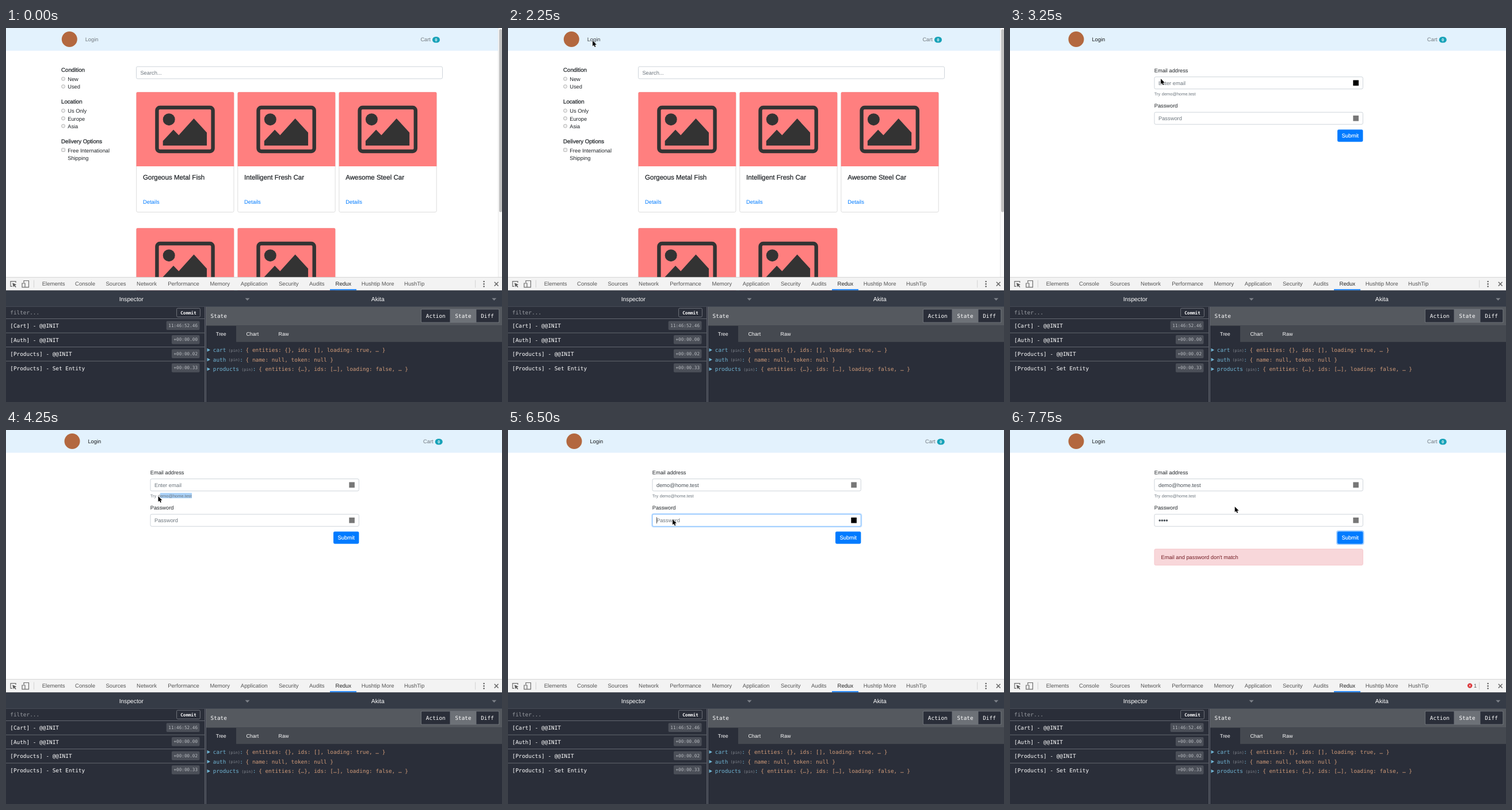
These frames come from a looping animation (862 by 649 pixels, 8000 ms). An HTML page:

```html
<!DOCTYPE html>
<html lang="en">
<head>
<meta charset="utf-8">
<title>Store login demo</title>
<style>
html, body { margin: 0; width: 100%; height: 100%; overflow: hidden; background: #fff; }
svg { display: block; width: 862px; height: 649px; }
text { font-family: "Liberation Sans", Arial, sans-serif; text-rendering: geometricPrecision; white-space: pre; }
.mono { font-family: "DejaVu Sans Mono", monospace; }
</style>
</head>
<body>
<script>
const LOOP = 8000, TICK = 250;
const EMAIL = 'demo@home.test';
const INK = '#212529', MUTED = '#6c757d', BLUE = '#007bff', PANEL = '#2a2e39';

function el(parent, tag, attrs = {}, content) {
  const node = document.createElementNS('http://www.w3.org/2000/svg', tag);
  for (const k in attrs) node.setAttribute(k, attrs[k]);
  if (content !== undefined) node.textContent = content;
  if (parent) parent.append(node);
  return node;
}
const group = (parent, attrs) => el(parent, 'g', attrs);
const rect = (p, x, y, width, height, fill, more) => el(p, 'rect', { x, y, width, height, fill, ...more });
const path = (p, d, attrs) => el(p, 'path', { d, ...attrs });
const dot = (p, cx, cy, r, fill, more) => el(p, 'circle', { cx, cy, r, fill, ...more });
// Text is placed by the middle of its capitals.
const text = (p, x, cy, s, size, fill, more) =>
  el(p, 'text', { x, y: cy + size * 0.36, 'font-size': size, fill, ...more }, s);
const mono = (p, x, cy, s, fill, size = 9.4, more) =>
  text(p, x, cy, s, size, fill, { class: 'mono', ...more });
const medium = (color, width = 0.25) => ({ stroke: color, 'stroke-width': width });
const show = (node, on) => node.setAttribute('display', on ? 'inline' : 'none');

const svg = el(null, 'svg', { viewBox: '0 0 862 649', width: 862, height: 649 });
document.body.prepend(svg);
rect(svg, 0, 0, 862, 649, '#fff');
rect(svg, 0, 0, 862, 39.5, '#e3f2fd');

// Navigation bar
const nav = group(svg);
dot(nav, 110.3, 19.5, 13.5, '#b3683f');
const loginLink = text(nav, 137.7, 20, 'Login', 9.3, '#000');
text(nav, 720.4, 20, 'Cart', 9.3, '#000', { 'fill-opacity': 0.5 });
rect(nav, 741, 15.2, 13, 10.4, '#17a2b8', { rx: 5.2 });
text(nav, 747.5, 20.5, '0', 7, '#fff', { 'text-anchor': 'middle', 'font-weight': 700 });

// Product list
const shop = group(svg);
const heading = (y, s) => text(shop, 96, y, s, 9.7, INK, medium(INK));
const option = (y, s) => {
  dot(shop, 99.5, y - 0.4, 3, '#f0f0f0', { stroke: '#a3a3a3', 'stroke-width': 0.8 });
  text(shop, 107.2, y, s, 9.3, INK);
};
heading(72.5, 'Condition');
option(88.6, 'New');
option(101.9, 'Used');
heading(127.8, 'Location');
option(143.9, 'Us Only');
option(157.2, 'Europe');
option(170.5, 'Asia');
heading(196.3, 'Delivery Options');
rect(shop, 96.7, 208.7, 5.8, 5.8, '#f0f0f0', { rx: 1, stroke: '#a3a3a3', 'stroke-width': 0.8 });
text(shop, 107.2, 212.6, 'Free International', 9.3, INK);
text(shop, 107.2, 226, 'Shipping', 9.3, INK);

function input(p, x, y, w, h) {
  return rect(p, x, y, w, h, '#fff', { rx: 2.3, stroke: '#ced4da', 'stroke-width': 1 });
}
input(shop, 226.5, 67, 532, 21);
text(shop, 233.4, 77.8, 'Search...', 9.3, MUTED);

function card(x, y, title) {
  const g = group(shop, { transform: `translate(${x} ${y})` });
  rect(g, 0.5, 0.5, 169.3, 208, '#fff', { rx: 2.3, stroke: '#dadada', 'stroke-width': 0.9 });
  path(g, 'M.3 129V2Q.3 .2 2.3 .2H168Q170 .2 170 2V129Z', { fill: '#ff7f7f' });
  rect(g, 36.2, 27, 97.2, 76, 'none', { rx: 5, stroke: '#333', 'stroke-width': 6.4 });
  dot(g, 57, 47.7, 10.5, '#333');
  path(g, 'M46.5 93V85L64.8 65.5 74 75 100.3 46 122.8 70.5V93Z', { fill: '#333' });
  if (!title) return;
  text(g, 11.8, 147.7, title, 11.55, INK, medium(INK));
  text(g, 11.8, 190.6, 'Details', 9.4, BLUE);
}
card(226.2, 111, 'Gorgeous Metal Fish');
card(402.3, 111, 'Intelligent Fresh Car');
card(578.4, 111, 'Awesome Steel Car');
card(226.2, 347);
card(402.3, 347);
rect(shop, 855, 0, 7, 433, '#fafafa');
rect(shop, 855, 0, 0.8, 433, '#e6e6e6');
rect(shop, 857, 2, 5, 317.5, '#c1c1c1', { rx: 2.5 });

// Login form
const form = group(svg);
function field(y, label, hint) {
  text(form, 250.8, y - 21.8, label, 9.25, INK);
  const ring = rect(form, 249.3, y - 12.3, 366, 24.6, '#bfdeff', { rx: 3.8 });
  const box = input(form, 251, y - 10.5, 362.3, 21);
  const placeholder = text(form, 258, y + 0.3, hint, 9.3, MUTED);
  const badge = rect(form, 596.3, y - 4.8, 9.6, 9.6, '#777');
  const caret = rect(form, 0, y - 5.5, 0.8, 11, '#333');
  return { ring, box, placeholder, badge, caret };
}
const email = field(95.3, 'Email address', 'Enter email');
const pass = field(156.7, 'Password', 'Password');
const emailValue = text(form, 258, 95.6, EMAIL, 9.3, '#495057');
const bullets = [0, 1, 2, 3].map(i => dot(form, 260.2 + i * 4.1, 157, 1.75, '#495057'));
const selection = rect(form, 0, 109.2, 0, 9.2, '#a9d1f8');
text(form, 250.8, 114, 'Try ', 7.45, MUTED);
text(form, 263.8, 114, EMAIL, 7.45, MUTED);
const submitRing = rect(form, 567, 174.2, 48.4, 25, '#9fcdff', { rx: 4 });
const submit = rect(form, 569, 176.2, 44.4, 21.2, BLUE, { rx: 2.3 });
text(form, 591.2, 187, 'Submit', 9.5, '#fff', { 'text-anchor': 'middle', ...medium('#fff', 0.15) });
const alertBox = group(form);
rect(alertBox, 251, 206.6, 362.3, 28, '#f8d7da', { rx: 2.3, stroke: '#f5c6cb', 'stroke-width': 0.9 });
text(alertBox, 262.5, 220.8, "Email and password don't match", 9.3, '#721c24');

// Link address bubble
const bubble = group(svg);
rect(bubble, -3, 421, 291, 14, '#000', { opacity: 0.12, rx: 2 });
rect(bubble, -2, 419.5, 288.5, 14, '#fff', { stroke: '#bcbcbc', 'stroke-width': 0.8 });
text(bubble, 1, 426.3, 'localhost:8888/login', 8.35, '#555');

// Developer tools toolbar
const tools = group(svg);
rect(tools, 0, 432.5, 862, 23, '#f3f3f3');
rect(tools, 0, 432.3, 862, 0.8, '#cbcbcb');
const line = { fill: 'none', stroke: '#6b6b6b', 'stroke-width': 1.2 };
path(tools, 'M17 442V439.6H8V448.4H11', line);
path(tools, 'M11.2 442.3 18.2 445.2 15.4 446.4 17.8 449.2 16.6 450.2 14.3 447.4 12.8 449.8Z', { fill: '#5a5a5a' });
path(tools, 'M31 442V438.5H39.5V449.8H33.5M28 443H33V449.8H28Z', line);
rect(tools, 48, 437.5, 0.8, 13, '#ccc');
rect(tools, 815.3, 437.5, 0.8, 13, '#ccc');
const tabs = [[62.7, 'Elements'], [120, 'Console'], [173.5, 'Sources'], [227, 'Network'],
  [281.2, 'Performance'], [354.5, 'Memory'], [407.8, 'Application'], [474, 'Security'],
  [527, 'Audits'], [572.5, 'Redux'], [617.8, 'Hushtip More'], [692, 'HushTip']];
for (const [x, s] of tabs) text(tools, x, 444, s, 9.55, s === 'Redux' ? '#222' : '#555');
rect(tools, 563, 453.2, 46, 2.2, '#1a82f7');
for (const y of [440, 444.2, 448.4]) dot(tools, 830.6, y, 1.25, '#5a5a5a');
path(tools, 'M848.8 440.8 855.6 447.6M855.6 440.8 848.8 447.6', { ...line, 'stroke-width': 1.5 });
const errorBadge = group(tools);
dot(errorBadge, 799.2, 443.6, 4.2, '#db3236');
path(errorBadge, 'M797.6 442 800.8 445.2M800.8 442 797.6 445.2', { stroke: '#fff', 'stroke-width': 1 });
text(errorBadge, 806, 444, '1', 9.3, '#555');

// State inspector
rect(svg, 0, 455.5, 862, 194, PANEL);
rect(svg, 0, 455.5, 862, 28, '#353b46');
rect(svg, 0, 483.2, 862, 0.8, '#4b505a');
for (const [x, s] of [[217.8, 'Inspector'], [646.2, 'Akita']])
  text(svg, x, 470, s, 10.25, '#fff', { 'text-anchor': 'middle' });
for (const x of [419.5, 848.3])
  path(svg, `M${x - 4} 468.7h8l-4 4.2Z`, { fill: '#7c8088' });

mono(svg, 7.3, 494, 'filter...', '#999ca2');
rect(svg, 296.6, 486.3, 40.8, 15.2, PANEL, { rx: 2, stroke: '#70747c', 'stroke-width': 1 });
mono(svg, 317, 493.8, 'Commit', '#fff', 7.6, { 'text-anchor': 'middle', 'font-weight': 700 });
const actions = [['[Cart] - @@INIT', '11:46:52.46'], ['[Auth] - @@INIT', '+00:00.00'],
  ['[Products] - @@INIT', '+00:00.02'], ['[Products] - Set Entity', '+00:00.33']];
actions.forEach(([name, stamp], i) => {
  const y = 516.6 + i * 24.5, w = stamp.length * 4.62 + 7;
  rect(svg, 0, y - 12.5, 345, 0.9, '#6a6e76');
  mono(svg, 7.3, y + 0.3, name, '#fff');
  rect(svg, 336.5 - w, y - 8, w, 15.4, '#4b4f58', { rx: 2 });
  mono(svg, 333, y - 0.4, stamp, '#b8bbc0', 7.67, { 'text-anchor': 'end' });
});
rect(svg, 345, 484, 0.9, 165, '#6a6e76');
rect(svg, 347, 484, 0.9, 165, '#6a6e76');

rect(svg, 348, 484, 514, 32.5, '#55595f');
mono(svg, 355.6, 499.2, 'State', '#fff');
rect(svg, 721.5, 488, 135, 23, PANEL, { rx: 2 });
rect(svg, 772, 488, 45, 23, '#6d7177');
path(svg, 'M772 488V511M817 488V511M722 488H856Q857 488 857 489V511H721.5V488', {
  fill: 'none', stroke: '#70747b', 'stroke-width': 0.9 });
for (const [x, s] of [[746.8, 'Action'], [794.5, 'State'], [836.5, 'Diff']])
  mono(svg, x, 499.2, s, '#fff', 9.4, { 'text-anchor': 'middle' });
rect(svg, 400, 516.5, 462, 28.3, '#454950');
for (const [x, s] of [[373.8, 'Tree'], [428.3, 'Chart'], [482.5, 'Raw']])
  text(svg, x, 531, s, 8.9, '#fff', { 'text-anchor': 'middle' });

const stores = [['cart', '{ entities: {}, ids: [], loading: true, … }'],
  ['auth', '{ name: null, token: null }'],
  ['products', '{ entities: {…}, ids: […], loading: false, … }']];
stores.forEach(([key, value], i) => {
  const y = 558.8 + i * 16.6, x = 360 + key.length * 5.65;
  path(svg, `M349.5 ${y - 3}l5.5 3-5.5 3Z`, { fill: '#6fb3d2' });
  mono(svg, 359.8, y, key, '#6fb3d2');
  mono(svg, x + 4, y + 0.5, '(pin)', '#858a92', 6.7);
  mono(svg, x + 23.6, y, ':', '#6fb3d2');
  mono(svg, x + 34, y, value, '#cf9a78');
});

const pointer = path(svg, 'M0 0V9.6L2.2 7.5 3.8 11 5.4 10.3 3.9 6.9H6.9Z', {
  stroke: '#fff', 'stroke-width': 0.8, 'paint-order': 'stroke' });

// Each step changes only the values it names.
const start = { at: null, page: 'shop', link: 0.5, bubble: false, badges: false, hover: null,
  focus: null, from: null, value: false, typed: 0, press: false, failed: false };
const steps = [
  [1500, { at: [104, 312] }],
  [1750, { at: [140, 150] }],
  [2000, { at: [147, 34] }],
  [2250, { at: [147, 22], link: 0.75 }],
  [2500, { page: 'login', link: 0.9, bubble: true }],
  [3000, { at: [172, 44], bubble: false, badges: true }],
  [3250, { at: [262, 88], hover: 'email' }],
  [3500, { at: [312, 98], focus: 'email' }],
  [3750, { at: [323, 113], hover: null }],
  [4000, { at: [322, 115], focus: null }],
  [4250, { at: [264.5, 115], from: 268 }],
  [4500, { at: [262, 117], from: 263.6 }],
  [5250, { at: [265, 110] }],
  [5500, { at: [268, 101], hover: 'email' }],
  [5750, { at: [268.5, 99.3] }],
  [6000, { focus: 'email', from: null }],
  [6250, { at: [272, 134], value: true, hover: null }],
  [6500, { at: [286, 155], focus: 'pass', hover: 'pass' }],
  [6750, { typed: 2 }],
  [7000, { at: [470, 178], typed: 4, hover: null }],
  [7250, { at: [601.3, 193.5] }],
  [7500, { focus: 'submit', press: true, failed: true }],
  [7750, { at: [390.7, 133], press: false }],
];

function stateAt(t) {
  return Object.assign({}, start, ...steps.filter(s => s[0] <= t).map(s => s[1]));
}

function drawField(f, name, s, filled, caretX) {
  const on = s.focus === name;
  show(f.ring, on);
  show(f.caret, on);
  f.caret.setAttribute('x', caretX);
  f.box.setAttribute('stroke', on ? '#80bdff' : '#ced4da');
  show(f.placeholder, !filled);
  show(f.badge, s.badges);
  f.badge.setAttribute('fill', s.hover === name ? '#000' : '#777');
}

function draw(t) {
  const s = stateAt(t), onShop = s.page === 'shop';
  show(shop, onShop);
  show(form, !onShop);
  nav.setAttribute('transform', `translate(${onShop ? 0 : 4.7} 0)`);
  loginLink.setAttribute('fill-opacity', s.link);
  show(bubble, s.bubble);
  drawField(email, 'email', s, s.value, s.value ? 331 : 258);
  drawField(pass, 'pass', s, s.typed > 0, 258 + s.typed * 4.1);
  show(emailValue, s.value);
  bullets.forEach((b, i) => show(b, i < s.typed));
  show(selection, s.from !== null);
  if (s.from !== null) {
    selection.setAttribute('x', s.from);
    selection.setAttribute('width', 323 - s.from);
  }
  show(submitRing, s.focus === 'submit');
  submit.setAttribute('fill', s.press ? '#0069d9' : BLUE);
  show(alertBox, s.failed);
  show(errorBadge, s.failed);
  show(pointer, s.at !== null);
  if (s.at) pointer.setAttribute('transform', `translate(${s.at})`);
}

let last = -1;
const begin = performance.now();
function frame() {
  const t = Math.floor(((performance.now() - begin) % LOOP) / TICK) * TICK;
  if (t !== last) draw(last = t);
  requestAnimationFrame(frame);
}
frame();
</script>
</body>
</html>
```
